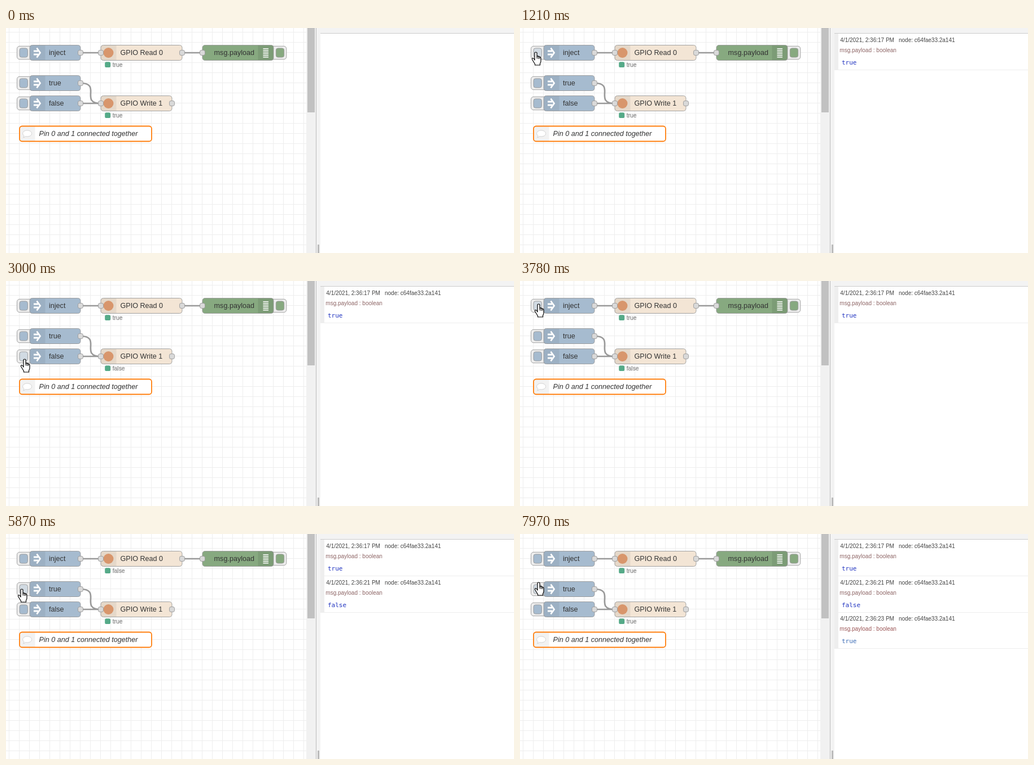
Animation, 900 px wide and 400 px high, one loop 8 s. Source, as an HTML page:

```html
<!DOCTYPE html>
<html lang="en">
<head>
<meta charset="utf-8">
<title>GPIO flow</title>
<style>
html, body { margin: 0; width: 100%; height: 100%; overflow: hidden; background: #fff; }
svg { display: block; width: 900px; height: 400px; font-family: "Liberation Sans", Arial, sans-serif; }
.label { font-size: 12.6px; fill: #333; }
.status { font-size: 10.4px; fill: #888; stroke: #888; stroke-width: .25; }
.small { font-size: 10px; }
.value { font: 11px "DejaVu Sans Mono", monospace; }
</style>
</head>
<body>
<svg id="stage" viewBox="0 0 900 400" xmlns="http://www.w3.org/2000/svg"></svg>
<script>
const NS = 'http://www.w3.org/2000/svg';
const LOOP = 8000;
const stage = document.getElementById('stage');

function add(tag, attrs, parent = stage, text) {
  const el = document.createElementNS(NS, tag);
  for (const k in attrs) el.setAttribute(k, attrs[k]);
  if (text !== undefined) el.textContent = text;
  parent.appendChild(el);
  return el;
}
const box = (x, y, width, height, fill, more, parent) =>
  add('rect', { x, y, width, height, fill, ...more }, parent);
const path = (d, attrs, parent) => add('path', { d, fill: 'none', ...attrs }, parent);
const label = (x, y, text, more) => add('text', { x, y, class: 'label', ...more }, stage, text);
const show = (el, on) => el.setAttribute('visibility', on ? 'visible' : 'hidden');

const EDGE = { stroke: '#999', 'stroke-width': .9 };
const BLUE = '#a6bbcf', GREEN = '#87a980', SAND = '#f3e5d5';

function drawGrid() {
  let d = '';
  for (let x = 5.5; x < 532; x += 18) d += `M${x} 0V400`;
  for (let y = 7.5; y < 400; y += 18) d += `M0 ${y}H532`;
  path(d, { stroke: '#eee' });
}

function drawPanels() {
  box(532, 0, 17, 400, '#f1f1f1');
  box(534, 0, 13, 150, '#c1c1c1');
  box(549, 0, 8, 400, '#f3f3f3');
  box(549, 0, 1, 400, '#bbb');
  box(552, 385, 3, 15, '#bbb');
  box(556, 0, 344, 10, '#f3f3f3');
  box(557, 9, 343, 1, '#ccc');
}

function port(x, cy) {
  box(x - 4.5, cy - 4.5, 9, 9, '#d9d9d9', { rx: 2.7, ...EDGE });
}

function nodeBody(x, cy, w, fill) {
  box(x, cy - 13.5, w, 27, fill, { rx: 4.5, ...EDGE });
}

function button(x, cy, keyX, fill) {
  box(x, cy - 11.7, 28.8, 23.4, '#eee', { rx: 4.5, ...EDGE });
  return box(keyX, cy - 8.1, 14.4, 16.2, fill, { rx: 3.6, ...EDGE });
}

function injectNode(cy, text) {
  const key = button(19.5, cy, 24, BLUE);
  nodeBody(42, cy, 90, BLUE);
  box(42.5, cy - 13, 27, 26, '#000', { opacity: .06 });
  path(`M49 ${cy - 3}H57M49 ${cy + 3}H57M54.5 ${cy - 8.5}L60.5 ${cy}L54.5 ${cy + 8.5}`,
    { stroke: '#fff', 'stroke-width': 2.8 });
  label(76, cy + 4.3, text);
  port(132, cy);
  return key;
}

function gpioNode(cy, w, text) {
  nodeBody(168, cy, w, SAND);
  box(168.5, cy - 13, 27, 26, '#000', { opacity: .06 });
  add('circle', { cx: 181.5, cy, r: 9, fill: '#d8966c' });
  label(202.5, cy + 4.3, text);
  port(168, cy);
  port(168 + w, cy);
  box(175.2, cy + 16.2, 9.9, 9.9, '#55aa88', { rx: 2.7 });
  return add('text', { x: 188.7, y: cy + 25, class: 'status' });
}

function debugNode(cy) {
  button(468, cy, 478.3, GREEN);
  nodeBody(348, cy, 126, GREEN);
  box(446.5, cy - 13, 27, 26, '#000', { opacity: .08 });
  for (let i = 0; i < 6; i++) box(455.5, cy - 8 + i * 3, 9.5, 1.5, '#fff');
  label(440, cy + 4.3, 'msg.payload', { 'text-anchor': 'end' });
  port(348, cy);
}

function commentNode() {
  box(24, 174.5, 234, 27, '#fff', { rx: 4.5 });
  box(24.5, 175, 27, 26, '#f2f2f2');
  path('M37.5 182C42.5 182 45.5 184.6 45.5 187.6S42.5 193 37.5 193Q36 193 34.8 192.7Q33 194.5 30.7 194.7Q32 193.2 32 191.5Q29.7 190 29.7 187.6C29.7 184.6 32.7 182 37.5 182Z',
    { fill: '#fff', stroke: '#ccc', 'stroke-width': .9 });
  box(24, 174.5, 234, 27, 'none', { rx: 4.5, stroke: '#ff7f0e', 'stroke-width': 1.8 });
  label(58.5, 192.2, 'Pin 0 and 1 connected together', { 'font-style': 'italic' });
}

function message(i, time, value, tint, blue) {
  const g = add('g', { transform: `translate(0 ${10 + Math.round(i * 64.6)})` });
  box(557, 0, 7, 64, '#eee', {}, g);
  box(557, 64, 343, 1, '#eee', {}, g);
  const line = (x, y, text, cls, fill) => add('text', { x, y, class: cls, fill }, g, text);
  line(567.3, 15, `4/1/2021, ${time} PM`, 'small', '#444');
  line(671, 15, 'node: c64fae33.2a141', 'small', '#444');
  line(566.3, 33, 'msg.payload : boolean', 'small', tint);
  line(570, 55, value, 'value', blue);
  return g;
}

drawGrid();
path('M132 44H168M312 44H348M132 98C170 98 130 134 168 134M132 134H168',
  { stroke: '#999', 'stroke-width': 2.7 });
const rows = [44, 98, 134];
const keys = ['inject', 'true', 'false'].map((text, i) => injectNode(rows[i], text));
const readStatus = gpioNode(44, 144, 'GPIO Read 0');
const writeStatus = gpioNode(134, 126, 'GPIO Write 1');
debugNode(44);
commentNode();
drawPanels();

const messages = [
  { at: 1210, el: message(0, '2:36:17', 'true', '#8d6464', '#2033c0') },
  { at: 4400, el: message(1, '2:36:21', 'false', '#8d6464', '#2033c0') },
  { at: 6790, el: message(2, '2:36:23', 'true', '#9a5454', '#3a6bb5') }
];

const ring = add('circle', { r: 15, fill: '#ff0', opacity: .47 });
const pointer = add('g', {});
const shapes = {
  hand: add('g', {}, pointer),
  move: path('M0-11L4.5-6.5H1.5V-1.5H6.5V-4.5L11 0L6.5 4.5V1.5H1.5V6.5H4.5L0 11L-4.5 6.5H-1.5V1.5H-6.5V4.5L-11 0L-6.5-4.5V-1.5H-1.5V-6.5H-4.5Z',
    { fill: '#fff', stroke: '#000', 'stroke-width': 1.2 }, pointer),
  cross: path('M-12 0H12M0-12V12', { stroke: '#000', 'stroke-width': 2 }, pointer)
};
path('M-2 14V2Q-2 0 0 0T2 2V8Q2 6.7 3.2 6.7T4.4 8.5Q4.4 7.4 5.6 7.4T6.8 9.5Q6.8 8.6 7.9 8.6T9 10.5V16Q9 18 7.5 20V23H-1.5V21Q-4 17 -6 13.7Q-7.4 11 -5.3 10.5Q-3.7 10.5 -2 14Z',
  { fill: '#fff', stroke: '#000', 'stroke-width': 1.2, 'stroke-linejoin': 'round' }, shapes.hand);
path('M2 8V11.5M4.4 8.5V12M6.8 9.5V12', { stroke: '#000' }, shapes.hand);

// Each move runs in equal steps; bend shapes the vertical pace.
const moves = [
  { from: 70, to: 830, steps: 11, x: 28, y: 43, bend: 1.4 },
  { from: 1610, to: 2360, steps: 11, x: 32.5, y: 132, bend: .9 },
  { from: 2450, to: 2600, steps: 3, x: 33, y: 139, bend: 1 },
  { from: 3160, to: 3780, steps: 9, x: 33, y: 41, bend: 1 },
  { from: 4940, to: 5550, steps: 9, x: 28, y: 98, bend: .75 },
  { from: 5950, to: 6410, steps: 7, x: 32, y: 45, bend: 1 },
  { from: 6870, to: 7260, steps: 6, x: 33, y: 101, bend: .9 },
  { from: 7970, to: 7970, steps: 1, x: 33, y: 86, bend: 1, late: true }
];
const clicks = [[1060, 1140], [2850, 2930], [4250, 4320], [5720, 5790], [6560, 6640]];

function pointerAt(t) {
  let x = -2, y = 222, hoverY = y;
  for (const m of moves) {
    if (t < m.from) break;
    const gap = (m.to - m.from) / (m.steps - 1 || 1) || 1;
    const u = Math.min(1, (Math.floor((t - m.from) / gap + .15) + 1) / m.steps);
    const startY = y;
    x += (m.x - x) * u;
    y += (m.y - y) * u ** m.bend;
    hoverY = m.late ? startY : y;
  }
  return { x, y, hoverY };
}

function shapeAt(x, y) {
  const row = rows.findIndex(cy => x >= 23 && x <= 39 && Math.abs(y - cy) <= 8);
  const onNode = rows.some(cy => x >= 19 && Math.abs(y - cy) <= 12);
  const onComment = x >= 23 && y >= 174 && y <= 202;
  return { row, name: row >= 0 ? 'hand' : onNode || onComment ? 'move' : 'cross' };
}

function render(t) {
  const p = pointerAt(t);
  const hover = shapeAt(p.x, p.hoverY);
  const inside = t >= 70;
  pointer.setAttribute('transform', `translate(${p.x.toFixed(1)} ${p.y.toFixed(1)})`);
  for (const name in shapes) show(shapes[name], inside && name === hover.name);
  keys.forEach((key, i) => key.setAttribute('fill-opacity', inside && i === hover.row ? .4 : 1));

  ring.setAttribute('cx', p.x - 1.5);
  ring.setAttribute('cy', p.y - 1);
  show(ring, clicks.some(([a, b]) => t >= a && t < b));

  readStatus.textContent = t >= 4400 && t < 6790 ? 'false' : 'true';
  writeStatus.textContent = t >= 3000 && t < 5870 ? 'false' : 'true';
  for (const m of messages) show(m.el, t >= m.at);
}

const begin = performance.now();
function tick() {
  render((performance.now() - begin) % LOOP);
  requestAnimationFrame(tick);
}
render(0);
requestAnimationFrame(tick);
</script>
</body>
</html>
```
